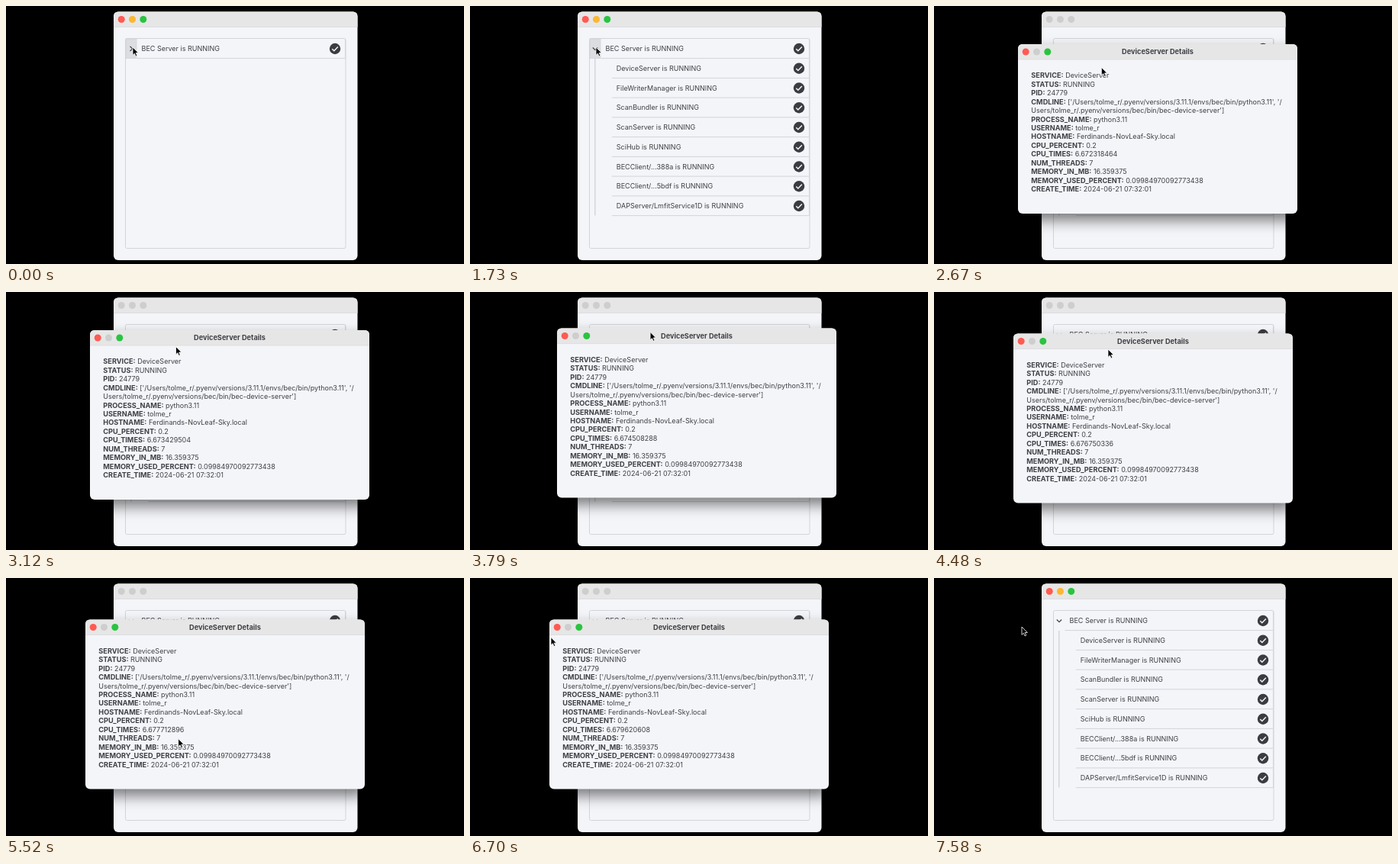
Animation of 600x338 px, one loop 7610 ms. Source, as an HTML page:

```html
<!DOCTYPE html>
<html lang="en">
<head>
<meta charset="utf-8">
<title>Server status</title>
<style>
  html, body { margin: 0; width: 100%; height: 100%; overflow: hidden; background: #000; }
  svg { display: block; width: 600px; height: 338px; }
  text { font: 9px Inter, "Open Sans", sans-serif; fill: #3f4046; }
  .bold { font-weight: 700; font-size: 9.2px; }
  .line { fill: none; stroke: #d3d4d9; }
  .shadow { filter: drop-shadow(0 9px 9px rgba(0, 0, 0, .5)); }
</style>
</head>
<body>
<svg viewBox="0 0 600 338">
  <defs>
    <g id="check">
      <circle r="7.2" fill="#3b3c42"/>
      <path d="M-3.7 .2L-1.2 2.7L3.8 -2.6" fill="none" stroke="#f4f5f9" stroke-width="1.5"/>
    </g>
  </defs>
  <g id="main"></g>
  <g id="dialog"></g>
  <path id="cursor" d="M0 0V10.4L2.4 8.2L4 11.9L5.8 11.1L4.2 7.5H7.4Z" fill="#000" stroke="#fff" stroke-width=".8"/>
</svg>
<script>
const LOOP = 7610, ROW = 25.75;
const COLORS = ['#ff5a52', '#fdb72e', '#29c440'];
const GREY = '#cecece';
const OPEN = 2400, CLOSE = 7470;
const $ = id => document.getElementById(id);

const services = ['DeviceServer', 'FileWriterManager', 'ScanBundler', 'ScanServer', 'SciHub',
  'BECClient/...388a', 'BECClient/...5bdf', 'DAPServer/LmfitService1D'];

const details = [
  ['SERVICE', 'DeviceServer'],
  ['STATUS', 'RUNNING'],
  ['PID', '24779'],
  ['CMDLINE', "['/Users/tolme_r/.pyenv/versions/3.11.1/envs/bec/bin/python3.11', '/"],
  ['', "Users/tolme_r/.pyenv/versions/bec/bin/bec-device-server']"],
  ['PROCESS_NAME', 'python3.11'],
  ['USERNAME', 'tolme_r'],
  ['HOSTNAME', 'Ferdinands-NovLeaf-Sky.local'],
  ['CPU_PERCENT', '0.2'],
  ['CPU_TIMES', ''],
  ['NUM_THREADS', '7'],
  ['MEMORY_IN_MB', '16.359375'],
  ['MEMORY_USED_PERCENT', '0.09984970092773438'],
  ['CREATE_TIME', '2024-06-21 07:32:01'],
];

// [time, cpu percent, cpu seconds]
const readings = [
  [0, '0.2', '6.672318464'], [2900, '0.2', '6.673429504'], [3400, '0.2', '6.674508288'],
  [3800, '0.3', '6.675616768'], [4250, '0.2', '6.676750336'], [5060, '0.2', '6.677712896'],
  [5640, '0.2', '6.678655488'], [6300, '0.2', '6.679620608'], [7050, '0.2', '6.680588288'],
];

// [time, x, y]
const cursorPath = [
  [0, 166, 54], [200, 165, 54], [1800, 165, 54], [2250, 217, 82], [2850, 220, 80],
  [3120, 222.5, 71.5], [3500, 232, 55], [3730, 232, 55], [3940, 252, 42.5], [4300, 226, 59],
  [4480, 228, 75], [4900, 216, 180], [5240, 221, 212], [5420, 224, 214], [5760, 232, 198],
  [6000, 232, 198], [6130, 236, 196], [6640, 106, 78], [6790, 106, 77], [7150, 115, 64], [LOOP, 115, 64],
];
const dialogPath = [
  [0, 110, 50], [3730, 110, 50], [3940, 129.6, 38], [4300, 104, 54.5], [LOOP, 104, 54.5],
];

function frame(x, y, w, h, prefix, cls) {
  const lights = COLORS.map((c, i) =>
    `<circle id="${prefix}${i}" cx="${x + 10.2 + i * 14.3}" cy="${y + 10}" r="4.5" fill="${c}"/>`).join('');
  return `<rect class="${cls}" x="${x}" y="${y}" width="${w}" height="${h}" rx="6" fill="#f4f5f9"/>
    <path d="M${x} ${y + 20}v-14q0 -6 6 -6h${w - 12}q6 0 6 6v14z" fill="#e6e6e6"/>
    <path class="line" d="M${x} ${y + 20}h${w}" stroke-width=".6"/>${lights}`;
}

function row(name, x, y) {
  return `<text x="${x}" y="${y + 3.2}">${name} is RUNNING</text>
    <use href="#check" x="431" y="${y}"/>
    <path class="line" d="M${x - 6} ${y + 12.6}H444.5V${y - 12.5}"/>`;
}

$('main').innerHTML = frame(141, 7.5, 319.5, 325.5, 'm', '') + `
  <rect class="line" x="156.5" y="42.5" width="288.5" height="275" rx="2"/>
  <rect id="hover" x="157" y="43" width="14" height="25.6" fill="#dcdde0" stroke="#cfd0d4" stroke-width=".7"/>
  <path id="chevron" fill="none" stroke="#3f4046" stroke-width="1.2"/>
  ${row('BEC Server', 177.5, 56)}
  <g id="tree"><path class="line" d="M163.8 69V274.5" stroke-width="1.4"/>
  ${services.map((s, i) => row(s, 191.8, 56 + ROW * (i + 1))).join('')}</g>`;

$('dialog').innerHTML = frame(0, 0, 366, 222, 'd', 'shadow') +
  '<text class="bold" x="183" y="13.2" text-anchor="middle">DeviceServer Details</text>' +
  details.map(([label, value], i) => `<text x="17.3" y="${44.2 + i * 11.46}">` +
    (label && `<tspan class="bold">${label}:</tspan> `) +
    `<tspan id="${label}">${value}</tspan></text>`).join('');
$('d1').setAttribute('fill', GREY);

const clamp = v => Math.min(1, Math.max(0, v));

function along(path, t) {
  const i = path.findIndex(p => p[0] > t);
  const [t0, x0, y0] = path[i - 1], [t1, x1, y1] = path[i];
  const u = (t - t0) / (t1 - t0), e = u * u * (3 - 2 * u);
  return [x0 + (x1 - x0) * e, y0 + (y1 - y0) * e];
}

function draw(now) {
  const t = now % LOOP;
  const expanded = t >= 300 && t < 1030 || t >= 1300;
  const shown = t >= OPEN && t < CLOSE + 110;
  const [cx, cy] = along(cursorPath, t);
  const [dx, dy] = along(dialogPath, t);

  $('tree').style.display = expanded ? '' : 'none';
  $('chevron').setAttribute('d', expanded ? 'M160.8 54.5l3.2 3.2l3.2 -3.2' : 'M162.5 52.8l3.2 3.2l-3.2 3.2');
  $('hover').style.display = !shown && cx > 157 && cx < 171 && cy > 43 && cy < 68 ? '' : 'none';
  COLORS.forEach((c, i) => $('m' + i).setAttribute('fill', shown ? GREY : c));

  $('dialog').style.display = shown ? '' : 'none';
  $('dialog').style.opacity = clamp((t - OPEN) / 130) * clamp((CLOSE + 110 - t) / 110);
  $('dialog').setAttribute('transform', `translate(${dx} ${dy})`);
  const [, percent, seconds] = readings.findLast(r => r[0] <= t);
  $('CPU_PERCENT').textContent = percent;
  $('CPU_TIMES').textContent = seconds;

  $('cursor').setAttribute('transform', `translate(${cx} ${cy})`);
  requestAnimationFrame(() => draw(performance.now() - start));
}

const start = performance.now();
draw(0);
</script>
</body>
</html>
```
